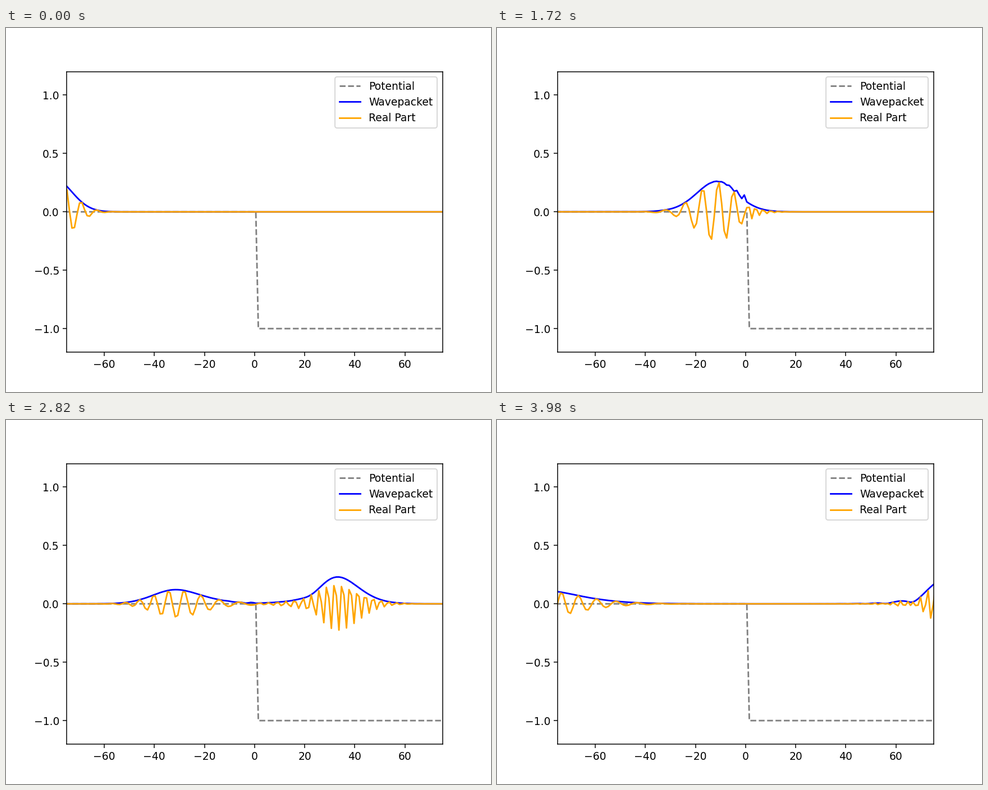
A matplotlib script that plays this animation: 864 px wide and 648 px high, repeating every 4 s.

```python
import numpy as np
import matplotlib.pyplot as plt
from matplotlib.animation import FuncAnimation

# Crank-Nicolson scattering of a Gaussian wavepacket on a downward step
N, STEPS, DT, DX = 200, 200, 1.0, 1.0
X0, K0, SIGMA = -80, 1.0, 5.0

x = np.linspace(-100, 100, N)
V = np.where(x > 1, -1.0, 0.0)


def propagator():
    off = np.ones(N - 1)
    lap = (np.diag(off, 1) + np.diag(off, -1) - 2 * np.eye(N)) / DX**2
    H = -0.5 * lap + np.diag(V)
    half = 0.5j * DT * H
    return np.linalg.solve(np.eye(N) + half, np.eye(N) - half)


def evolve():
    psi = np.exp(-((x - X0) ** 2) / (4 * SIGMA**2) + 1j * K0 * x)
    psi /= (2 * np.pi * SIGMA**2) ** 0.25
    U = propagator()
    states = [psi]
    for _ in range(STEPS - 1):
        states.append(U @ states[-1])
    return states


states = evolve()

fig, ax = plt.subplots(figsize=(6.4, 4.8), dpi=135)
ax.set_xlim(-75, 75)
ax.set_ylim(-1.2, 1.2)
ax.plot(x, V, "--", color="gray", label="Potential")
envelope, = ax.plot(x, np.abs(states[0]), color="blue", label="Wavepacket")
real, = ax.plot(x, states[0].real, color="orange", label="Real Part")
ax.legend(loc="upper right")


def update(i):
    envelope.set_ydata(np.abs(states[i]))
    real.set_ydata(states[i].real)
    return envelope, real


anim = FuncAnimation(fig, update, frames=STEPS, interval=20, repeat=True)
plt.show()
```
